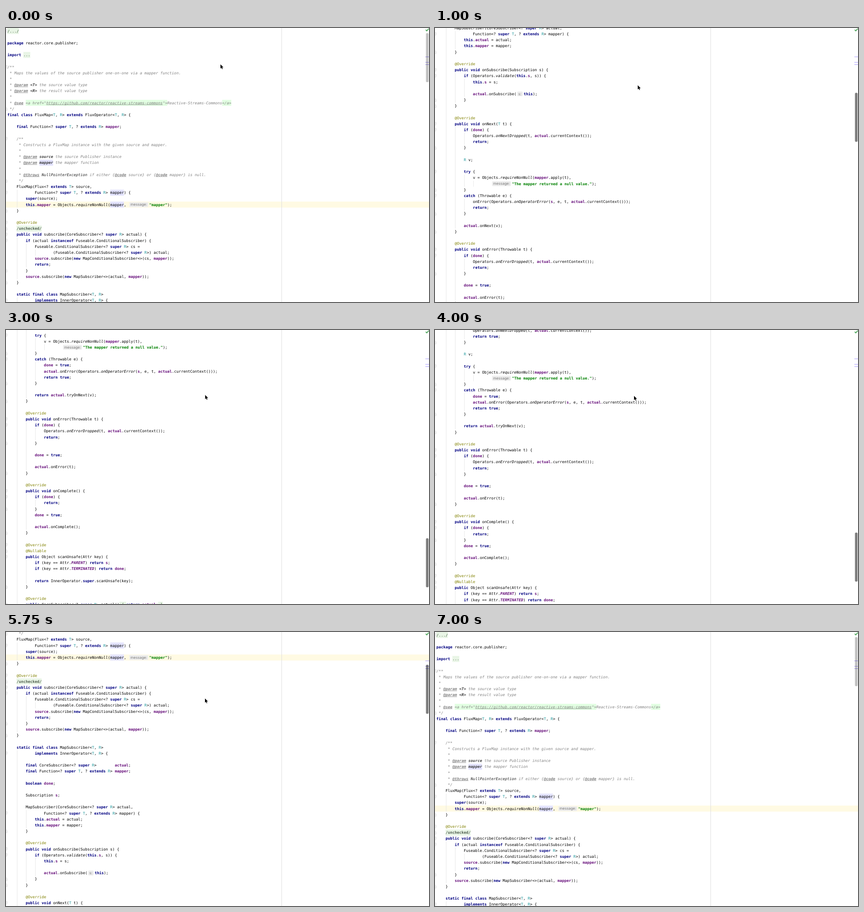
An HTML page with a canvas for the animation above (7500 ms loop, 929 by 603 pixels).

```html
<!DOCTYPE html>
<html lang="en">
<head>
<meta charset="utf-8">
<title>Scrolling through a Java class</title>
<style>
html, body { margin: 0; width: 100%; height: 100%; overflow: hidden; background: #fff; }
canvas { display: block; }
</style>
</head>
<body>
<canvas id="stage" width="929" height="603"></canvas>
<script>
const W = 929, H = 603, LOOP = 7500, STEP = 250, LAST_STEP = 7000;
const LINE = 13.175, SIZE = 8.333, CHAR = 5.017, LEFT = 3.1, BASELINE = 9.5;
const MONO = '"DejaVu Sans Mono", monospace';
const ACTIVE_LINE = 29;
const HINT_ADVANCE = { 'message:': 45.4, 's:': 16 };
const ctx = document.getElementById('stage').getContext('2d');

// Markup: #field, ~highlighted, ‹hint›, «folded»
const header = `«/.../»

package reactor.core.publisher;

import «...»

/**
 * Maps the values of the source publisher one-on-one via a mapper function.
 *
 * @param <T> the source value type
 * @param <R> the result value type
 *
 * @see <a href="https://github.com/reactor/reactive-streams-commons">Reactive-Streams-Commons</a>
 */
final class FluxMap<T, R> extends FluxOperator<T, R> {

    final Function<? super T, ? extends R> #mapper;

    /**
     * Constructs a FluxMap instance with the given source and mapper.
     *
     * @param source the source Publisher instance
     * @param mapper the mapper function
     *
     * @throws NullPointerException if either {@code source} or {@code mapper} is null.
     */
    FluxMap(Flux<? extends T> source,
            Function<? super T, ? extends R> ~mapper) {
        super(source);
        this.#mapper = Objects.requireNonNull(~mapper, ‹message:›"mapper");
    }

    @Override
    «/unchecked/»
    public void subscribe(CoreSubscriber<? super R> actual) {
        if (actual instanceof Fuseable.ConditionalSubscriber) {
            Fuseable.ConditionalSubscriber<? super R> cs =
                    (Fuseable.ConditionalSubscriber<? super R>) actual;
            #source.subscribe(new MapConditionalSubscriber<>(cs, #mapper));
            return;
        }
        #source.subscribe(new MapSubscriber<>(actual, #mapper));
    }
`;

const nextMethod = (signature, dropped, failure, finish) => `
        @Override
        public ${signature}(T t) {
            if (#done) {
                Operators.onNextDropped(t, #actual.currentContext());
                ${dropped}
            }

            R v;

            try {
                v = Objects.requireNonNull(#mapper.apply(t),
                        ‹message:›"The mapper returned a null value.");
            }
            catch (Throwable e) {
                ${failure}(Operators.onOperatorError(#s, e, t, #actual.currentContext()));
                ${dropped}
            }

            ${finish}
        }
`;

const subscriber = (name, parents, type, gaps, extra) => `
    static final class ${name}<T, R>
            implements ${parents} {

        final ${type}<? super R>${gaps[0]}#actual;
        final Function<? super T, ? extends R>${gaps[1]}#mapper;

        boolean #done;

        Subscription #s;

        ${name}(${type}<? super R> actual,
                Function<? super T, ? extends R> mapper) {
            this.#actual = actual;
            this.#mapper = mapper;
        }

        @Override
        public void onSubscribe(Subscription s) {
            if (Operators.validate(this.#s, s)) {
                this.#s = s;

                #actual.onSubscribe(‹s:›this);
            }
        }
${nextMethod('void onNext', 'return;', 'onError', '#actual.onNext(v);')}${extra}
        @Override
        public void onError(Throwable t) {
            if (#done) {
                Operators.onErrorDropped(t, #actual.currentContext());
                return;
            }

            #done = true;

            #actual.onError(t);
        }

        @Override
        public void onComplete() {
            if (#done) {
                return;
            }
            #done = true;

            #actual.onComplete();
        }

        @Override
        @Nullable
        public Object scanUnsafe(Attr key) {
            if (key == Attr.PARENT) return #s;
            if (key == Attr.TERMINATED) return #done;

            return InnerOperator.super.scanUnsafe(key);
        }

        @Override
        public CoreSubscriber<? super R> actual()« { »return #actual;« }»

        @Override
        public void request(long n)« { »#s.request(n);« }»

        @Override
        public void cancel()« { »#s.cancel();« }»
    }
`;

const tryNext = nextMethod('boolean tryOnNext', 'return true;', '#actual.onError', 'return #actual.tryOnNext(v);')
  .replace(/(\n +)(#actual\.onError)/, '$1#done = true;$1$2');

const source = (header
  + subscriber('MapSubscriber', 'InnerOperator<T, R>', 'CoreSubscriber', [' '.repeat(8), ' '], '')
  + subscriber('MapConditionalSubscriber', 'Fuseable.ConditionalSubscriber<T>, InnerOperator<T, R>',
    'Fuseable.ConditionalSubscriber', [' ', ' '.repeat(10)], tryNext)
  + '}').split('\n');

const CODE = new RegExp([
  '(?<string>".*?")', '(?<annotation>@\\w+)', '#(?<field>\\w+)', '~(?<marked>\\w+)',
  '‹(?<hint>.+?)›', '«(?<fold>.+?)»',
  '\\b(?<keyword>package|import|final|class|extends|implements|super|this|public|void|if|instanceof|new|return|static|boolean|long|try|catch|true)\\b',
  '\\b(?<typeVar>[TR])\\b', '(?<constant>PARENT|TERMINATED)',
  '(?<method>requireNonNull|validate|onNextDropped|onErrorDropped|onOperatorError)'
].join('|'), 'g');
const COMMENT = /(?<tag>@\w+)|(?<param>(?<=@param )\S+)|(?<type>NullPointerException)|(?<link>https[^"]+)|(?<markup><a href="|">|<\/a>)/g;

const FOLD = '#e9f5e6', MARK = '#e4e4ff', DOC_LINK = '#e2ffe2';
const STYLES = {
  plain: { color: '#000' },
  string: { color: '#008000', font: 'bold' },
  annotation: { color: '#808000' },
  field: { color: '#660e7a', font: 'bold' },
  marked: { color: '#000', back: MARK },
  hint: { color: '#7a7a7a' },
  fold: { color: '#3f5f3f', back: FOLD },
  unchecked: { color: '#4f5f4f', font: 'bold', back: FOLD },
  keyword: { color: '#000080', font: 'bold' },
  typeVar: { color: '#20999d' },
  constant: { color: '#660e7a', font: 'italic bold' },
  method: { color: '#000', font: 'italic' },
  comment: { color: '#808080', font: 'italic' },
  tag: { color: '#808080', font: 'italic bold', underline: true },
  param: { color: '#3d3d3d', font: 'italic bold' },
  markedParam: { color: '#3d3d3d', font: 'italic bold', back: MARK },
  type: { color: '#222', font: 'italic' },
  link: { color: '#808080', font: 'italic', underline: true, back: DOC_LINK },
  markup: { color: '#808080', font: 'italic', back: DOC_LINK }
};

function tokenize(line) {
  const isComment = /^\s*(\/\*\*|\*)/.test(line);
  const base = isComment ? 'comment' : 'plain';
  const runs = [];
  let x = LEFT, from = 0;
  const add = (text, kind) => {
    if (!text) return;
    const width = kind === 'hint' ? HINT_ADVANCE[text] : text.length * CHAR;
    runs.push({ text, kind, x, width });
    x += width;
  };
  for (const match of line.matchAll(isComment ? COMMENT : CODE)) {
    add(line.slice(from, match.index), base);
    let [kind, text] = Object.entries(match.groups).find(([, value]) => value);
    if (text === '/unchecked/') kind = 'unchecked';
    if (kind === 'param' && text === 'mapper') kind = 'markedParam';
    add(text, kind);
    from = match.index + match[0].length;
  }
  add(line.slice(from), base);
  return runs;
}

const lines = source.map(tokenize);

const indents = source.map(line => line.trim() ? Math.floor(line.search(/\S/) / 4) * 4 : Infinity);
const guides = [];
indents.forEach((indent, i) => {
  if (!indent || indent === Infinity) return;
  let end = i + 1;
  while (end < indents.length && indents[end] > indent) end++;
  while (end > i + 1 && indents[end - 1] === Infinity) end--;
  if (end > i + 1) guides.push({ x: LEFT + indent * CHAR + 1.3, from: i + 1, to: end });
});

const markers = source.map((line, i) => {
  if (/^\s*(\}|\*\/|@Nullable|«\/un)/.test(line)) return 'end';
  const opens = /^ .*\{$|^\s*\/\*\*|« \{|^«/.test(line);
  const stacked = /@Override/.test(line) && /@Nullable|unchecked/.test(source[i + 1]);
  return opens || stacked ? 'start' : '';
});

// Monotone cubic curve through [time, value] points
function curve(points) {
  const secant = i => (points[i + 1][1] - points[i][1]) / (points[i + 1][0] - points[i][0]);
  const slopes = points.map((_, i) => {
    if (i === 0 || i === points.length - 1) return 0;
    const a = secant(i - 1), b = secant(i);
    return a * b > 0 ? 2 * a * b / (a + b) : 0;
  });
  return t => {
    if (t >= points.at(-1)[0]) return points.at(-1)[1];
    const i = points.findIndex((p, k) => t < points[k + 1][0]);
    const [t0, v0] = points[i], [t1, v1] = points[i + 1];
    const span = t1 - t0, u = (t - t0) / span, s = u * u * (3 - 2 * u);
    return v0 + (v1 - v0) * s
      + span * u * (1 - u) * (slopes[i] * (1 - u) - slopes[i + 1] * u);
  };
}

const scrollAt = curve([[0, 0], [1000, 718], [2000, 1605.4], [3000, 2445.5], [3500, 2635], [5000, 1231], [6250, 6.9], [6500, 0]]);
const cursorX = curve([[0, 471], [1000, 445.3], [2000, 438], [3000, 437.4], [5000, 437]]);
const cursorY = curve([[0, 80], [1000, 126], [2000, 141.8], [3000, 143], [5000, 146.2]]);

function box(x, y, w, h, color, radius = 0) {
  ctx.fillStyle = color;
  ctx.beginPath();
  ctx.roundRect(x, y, w, h, radius);
  ctx.fill();
}

function path(points, close) {
  ctx.beginPath();
  points.forEach(([x, y]) => ctx.lineTo(x, y));
  if (close) ctx.closePath();
}

function drawRun({ text, kind, x, width }, top) {
  const style = STYLES[kind];
  if (kind === 'hint') {
    box(x + 1.8, top + 1.3, width - 4, 10.6, '#ededed', 2);
    ctx.font = '8px Inter, sans-serif';
    ctx.fillStyle = style.color;
    ctx.fillText(text, x + 4.3, top + 9.2);
    return;
  }
  if (style.back) box(x, top, width, LINE, style.back);
  ctx.font = `${style.font || ''} ${SIZE}px ${MONO}`;
  ctx.fillStyle = style.color;
  ctx.fillText(text, x, top + BASELINE);
  if (style.underline) box(x, top + BASELINE + 0.9, width, 0.8, style.color);
}

function drawMarker(kind, top) {
  const middle = top + 6.8, flip = kind === 'end' ? -1 : 1;
  ctx.strokeStyle = '#d4d4d4';
  ctx.lineWidth = 0.8;
  path([[-1, middle - 3.3 * flip], [2.4, middle - 3.3 * flip], [2.4, middle + 1.2 * flip], [0, middle + 3.5 * flip]]);
  ctx.stroke();
  path([[0, middle], [1.2, middle]]);
  ctx.stroke();
}

function drawScrollbar(scroll, t) {
  for (const y of [63, 75, 80]) box(921, y, 8, 1, '#a99bff');
  const shade = t === 0 || t >= LAST_STEP ? 0.24 : t > 6500 ? 0.38 : 0.5;
  box(922.3, 11.2 + scroll * 0.1828, 5.7, 108, `rgba(0, 0, 0, ${shade})`, 2.5);
}

function drawCheck() {
  ctx.strokeStyle = '#48a356';
  ctx.lineWidth = 1.8;
  path([[921.8, 3.8], [924.2, 6.4], [928.3, 1.4]]);
  ctx.stroke();
}

function drawCursor(x, y) {
  ctx.save();
  ctx.translate(x, y);
  path([[0, 0], [0, 9.2], [2.1, 7.3], [3.5, 10.6], [5, 10], [3.6, 6.8], [6.4, 6.6]], true);
  ctx.lineJoin = 'round';
  ctx.lineWidth = 1.4;
  ctx.strokeStyle = '#fff';
  ctx.stroke();
  ctx.fillStyle = '#000';
  ctx.fill();
  ctx.restore();
}

function draw(t) {
  const scroll = scrollAt(t);
  const topOf = i => i * LINE - scroll;
  box(0, 0, W, H, '#fff');
  box(0, topOf(ACTIVE_LINE), W, LINE, '#fffae3');
  box(605, 0, 1, H, '#dedede');
  for (const g of guides) box(g.x - 0.4, topOf(g.from), 0.8, (g.to - g.from) * LINE, '#e2e2e2');
  lines.forEach((runs, i) => {
    const top = topOf(i);
    if (top < -LINE || top > H) return;
    for (const run of runs) drawRun(run, top);
    if (markers[i]) drawMarker(markers[i], top);
  });
  drawScrollbar(scroll, t);
  drawCheck();
  if (t < LAST_STEP) drawCursor(cursorX(t), cursorY(t));
}

ctx.textRendering = 'geometricPrecision';
const start = performance.now();
function tick() {
  const t = (performance.now() - start) % LOOP;
  draw(Math.min(LAST_STEP, Math.floor(t / STEP) * STEP));
  requestAnimationFrame(tick);
}
tick();
</script>
</body>
</html>
```
